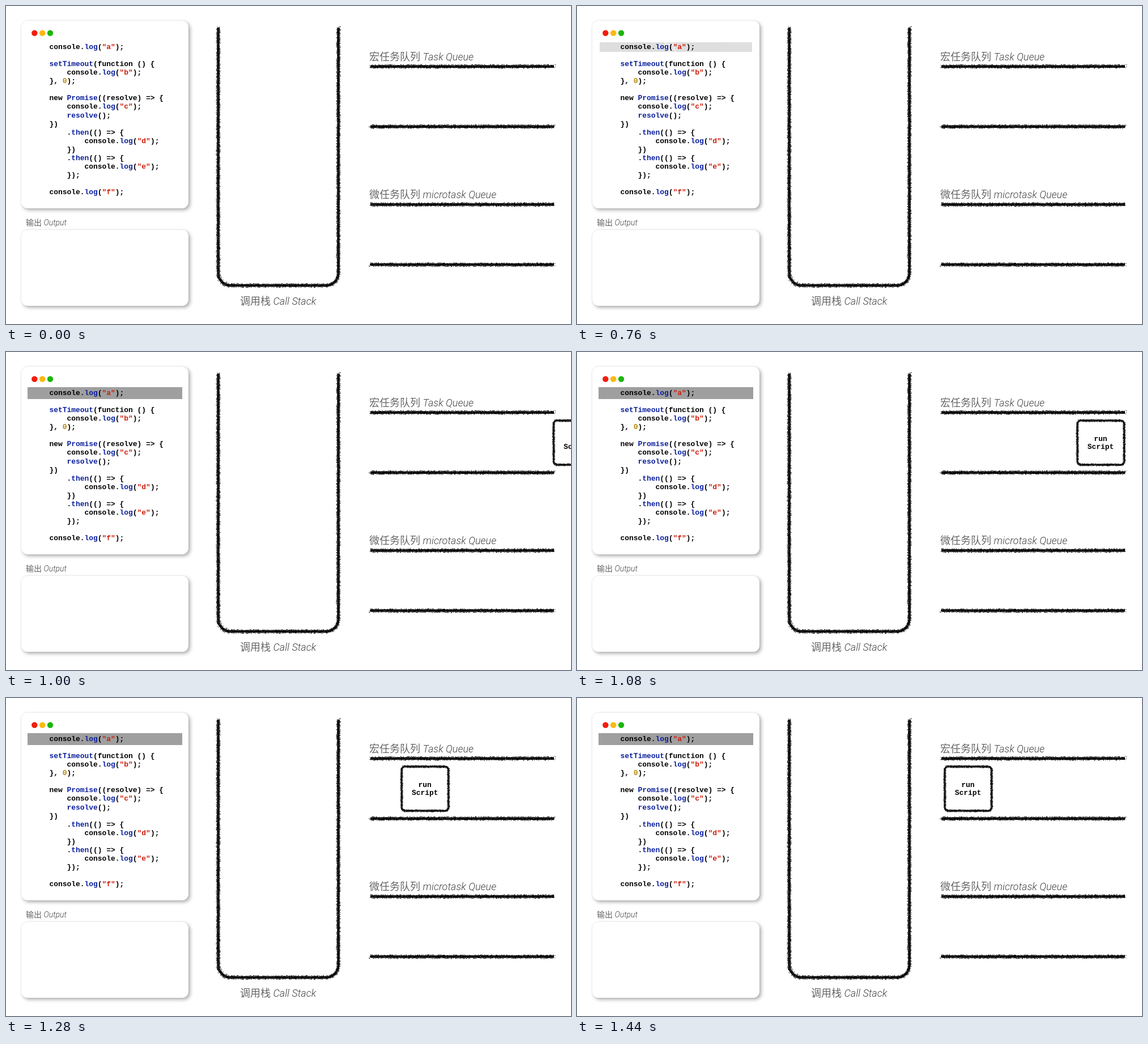
These frames come from a looping animation (997 by 561 pixels, 1.96 s). An HTML page:

```html
<!DOCTYPE html>
<html lang="zh">
<head>
<meta charset="utf-8">
<style>
  html, body { margin: 0; width: 100%; height: 100%; overflow: hidden; background: #fff; }
  #stage { position: relative; width: 997px; height: 561px; overflow: hidden; }
  #stage > * { position: absolute; }
  .panel { left: 27px; width: 295px; border-radius: 11px; background: #fff;
    box-shadow: 3px 3px 6px rgba(0, 0, 0, .32), 0 0 2px rgba(0, 0, 0, .14); }
  #bar { background: #9f9f9f; overflow: hidden; }
  #glint { position: absolute; top: 0; width: 17px; height: 100%; transform: skewX(20deg);
    background: linear-gradient(90deg, #fff5 0 55%, transparent 55% 72%, #fff5 72%); }
  pre { left: 76.5px; top: 65px; margin: 0; color: #000;
    font: bold 12.93px/15.06px "Liberation Mono", monospace; }
  .name { color: #0a1f9c; }
  .string { color: #cf1d0a; }
  .number { color: #b58a0b; }
  svg { left: 0; top: 0; }
  .label { font: 300 18px "Noto Sans CJK SC", "Noto Sans CJK", sans-serif; fill: #666; }
  .label tspan { font-family: Roboto, sans-serif; font-style: italic; fill: #444; }
  .label .small { font-size: 14px; }
  #task text { font: bold 12.93px "Liberation Mono", monospace; text-anchor: middle; }
</style>
</head>
<body>
<div id="stage">
  <div class="panel" style="top:26px;height:331px"></div>
  <div class="panel" style="top:395px;height:134px"></div>
  <div id="bar"><div id="glint"></div></div>
  <pre id="code">
console.log("a");

setTimeout(function () {
    console.log("b");
}, 0);

new Promise((resolve) => {
    console.log("c");
    resolve();
})
    .then(() => {
        console.log("d");
    })
    .then(() => {
        console.log("e");
    });

console.log("f");</pre>
  <svg id="art" width="997" height="561">
    <circle cx="50.3" cy="47.8" r="5.2" fill="#f21d0d"/>
    <circle cx="64.2" cy="47.8" r="5.2" fill="#fdb90a"/>
    <circle cx="78" cy="47.8" r="5.2" fill="#1db60c"/>
    <g class="label">
      <text x="641" y="95.5">宏任务队列 <tspan x="735.5">Task Queue</tspan></text>
      <text x="641" y="339">微任务队列 <tspan x="735.5">microtask Queue</tspan></text>
      <text x="413" y="526.7">调用栈 <tspan x="471.5">Call Stack</tspan></text>
      <text x="35" y="387.3" class="small">输出 <tspan x="66.5">Output</tspan></text>
    </g>
    <g id="task">
      <text x="690" y="157">run</text>
      <text x="690" y="171">Script</text>
    </g>
  </svg>
</div>
<script>
const $ = id => document.getElementById(id);
const [art, task, bar, glint, code] = ['art', 'task', 'bar', 'glint', 'code'].map($);

code.innerHTML = code.textContent.replace(
  /(log|setTimeout|Promise|then|resolve(?=\(\)))|(".")|\b0\b/g,
  (word, name, string) =>
    `<span class="${name ? 'name' : string ? 'string' : 'number'}">${word}</span>`);

let seed = 7;
const random = () => (seed = seed * 16807 % 2147483647) / 2147483647;

function addPath(parent, attributes) {
  const path = document.createElementNS('http://www.w3.org/2000/svg', 'path');
  for (const key in attributes) path.setAttribute(key, attributes[key]);
  return parent.appendChild(path);
}

// Solid core with scattered dark grains around it and a few pale ones inside.
function chalk(parent, d, width) {
  const core = addPath(parent, { d, fill: 'none', stroke: '#0a0a0a', 'stroke-width': width * .62 });
  const length = core.getTotalLength();
  const jitter = () => (random() - .5) * width - .5;
  let dark = '', pale = '';
  for (let s = 0, i = 0; s < length; s += .25, i++) {
    const p = core.getPointAtLength(s);
    const grain = `M${(p.x + jitter()).toFixed(1)} ${(p.y + jitter()).toFixed(1)}h1v1h-1z`;
    if (i % 10) dark += grain; else pale += grain;
  }
  addPath(parent, { d: dark, fill: '#0a0a0a' });
  addPath(parent, { d: pale, fill: '#fff', 'fill-opacity': .4 });
}

chalk(art, 'M374.5 38V471A22 22 0 0 0 396.5 493H564.5A22 22 0 0 0 586.5 471V38', 7.2);
for (const y of [106.7, 212.7, 350.2, 456.3]) chalk(art, `M643 ${y}H967`, 7.2);
chalk(task, 'M656 121H725Q731.7 121 731.7 128V192Q731.7 199 725 199H656Q649 199 649 192V128Q649 121 656 121', 4.6);

const progress = (t, from, to) => Math.min(1, Math.max(0, (t - from) / (to - from)));

function draw(now) {
  const t = Math.floor((now + 1) % 1960 / 40) * 40;

  const shown = progress(t, 640, 1000);
  const inset = 3 * (1 - shown);
  Object.assign(bar.style, {
    opacity: shown,
    left: 38 + inset + 'px', top: 62 + inset + 'px',
    width: 273 - 2 * inset + 'px', height: 21 - 2 * inset + 'px'
  });
  glint.style.left = -10 + 1.05 * (t - 640) + 'px';

  const distance = 234 * (1 + Math.cos(Math.PI * progress(t, 735, 1425)));
  task.setAttribute('transform', `translate(${distance.toFixed(2)})`);
  requestAnimationFrame(draw);
}
draw(0);
</script>
</body>
</html>
```
